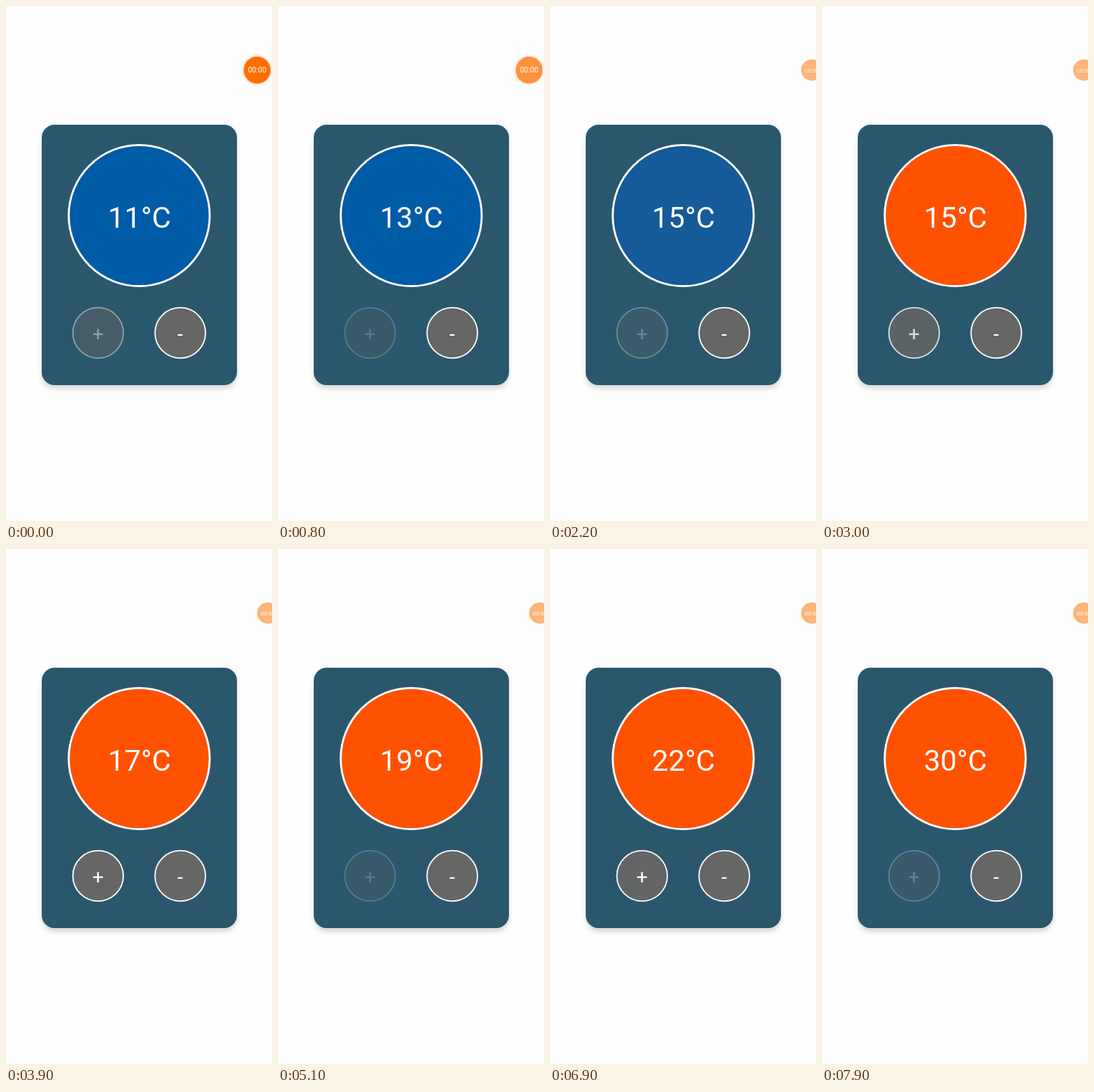
Recreate the animation shown at these times as an HTML page. Size 372 by 720 pixels, loop 8 s.

```html
<!DOCTYPE html>
<html>
<head>
<meta charset="utf-8">
<style>
  html, body { margin: 0; width: 100%; height: 100%; overflow: hidden; background: #fefefe; }
  svg { display: block; }
  text { font-family: Roboto, sans-serif; fill: #fff; text-anchor: middle; }
  .card { position: absolute; left: 50px; top: 165.5px; width: 272.5px; height: 364px;
    border-radius: 18px; background: #2b576d; box-shadow: 0 5px 7px rgba(0, 0, 0, .15); }
  svg { position: absolute; left: 0; top: 0; }
</style>
</head>
<body>
<div class="card"></div>
<svg width="372" height="720">
  <circle id="dial" cx="186.3" cy="293" r="98.6" stroke="#fff" stroke-width="2.8"/>
  <text id="temp" x="186.6" y="309.5" font-size="41"></text>
  <g id="plus">
    <circle cx="128.8" cy="457" r="35.3" fill="#666" stroke="#fff" stroke-width="1.8"/>
    <text x="128.8" y="468" font-size="28">+</text>
  </g>
  <g>
    <circle cx="243.7" cy="457" r="35.3" fill="#666" stroke="#fff" stroke-width="1.8"/>
    <text x="243.7" y="468" font-size="28">-</text>
  </g>
  <g id="badge">
    <circle id="halo" r="21.3" fill="#fce4d5"/>
    <circle r="18.8" fill="#fefefe"/>
    <circle id="disc" r="18.8" fill="#ff6f00"/>
    <text y="3.7" font-size="10.2">00:00</text>
  </g>
</svg>
<script>
const LOOP = 8000;
const COLD = [0, 91, 167], HOT = [255, 82, 0];
// Each tap on "+": finger down, finger up, reading after release
const taps = [
  [-300, -98, 11], [180, 380, 12], [620, 790, 13], [1230, 1490, 14],
  [1930, 2138, 15], [2950, 3150, 16], [3400, 3640, 17], [4110, 4260, 18],
  [4650, 5090, 19], [5350, 5495, 20], [5745, 5890, 21], [6330, 6590, 22],
  [6880, 7000, 23], [7550, 7855, 30]
];
const CUT = { at: 7300, value: 29 };

const $ = id => document.getElementById(id);
const clamp = x => Math.max(0, Math.min(1, x));
const progress = (t, start, length) => clamp((t - start) / length);
const ease = u => u < .5 ? 2 * u * u : 1 - 2 * (1 - u) ** 2;
const mix = (a, b, u) => a + (b - a) * u;

function tapState(t) {
  let opacity = 1, value = 11;
  for (const [down, up, reading] of taps) {
    if (t >= down) opacity = mix(1, .2, ease(progress(t, down, 150)));
    if (t >= up) {
      opacity = mix(.2, 1, ease(progress(t, up, 250)));
      value = reading;
    }
  }
  if (t >= CUT.at) value = Math.max(value, CUT.value);
  return { opacity, value };
}

function draw(t) {
  const { opacity, value } = tapState(t);
  $('plus').setAttribute('opacity', opacity);
  $('temp').textContent = value + '°C';

  const heat = ease(progress(t, 2100, 500));
  $('dial').setAttribute('fill', `rgb(${COLD.map((c, i) => Math.round(mix(c, HOT[i], heat)))})`);

  const fade = progress(t, 700, 200), slide = ease(progress(t, 1250, 500));
  $('badge').setAttribute('transform',
    `translate(${mix(351.2, 366, slide)} 89.6) scale(${mix(1, .79, slide)})`);
  $('disc').setAttribute('opacity', mix(1, .52, fade));
  $('halo').setAttribute('opacity', mix(1, .4, fade) * (1 - slide));
}

function frame() {
  draw(performance.now() % LOOP);
  requestAnimationFrame(frame);
}
frame();
</script>
</body>
</html>
```
